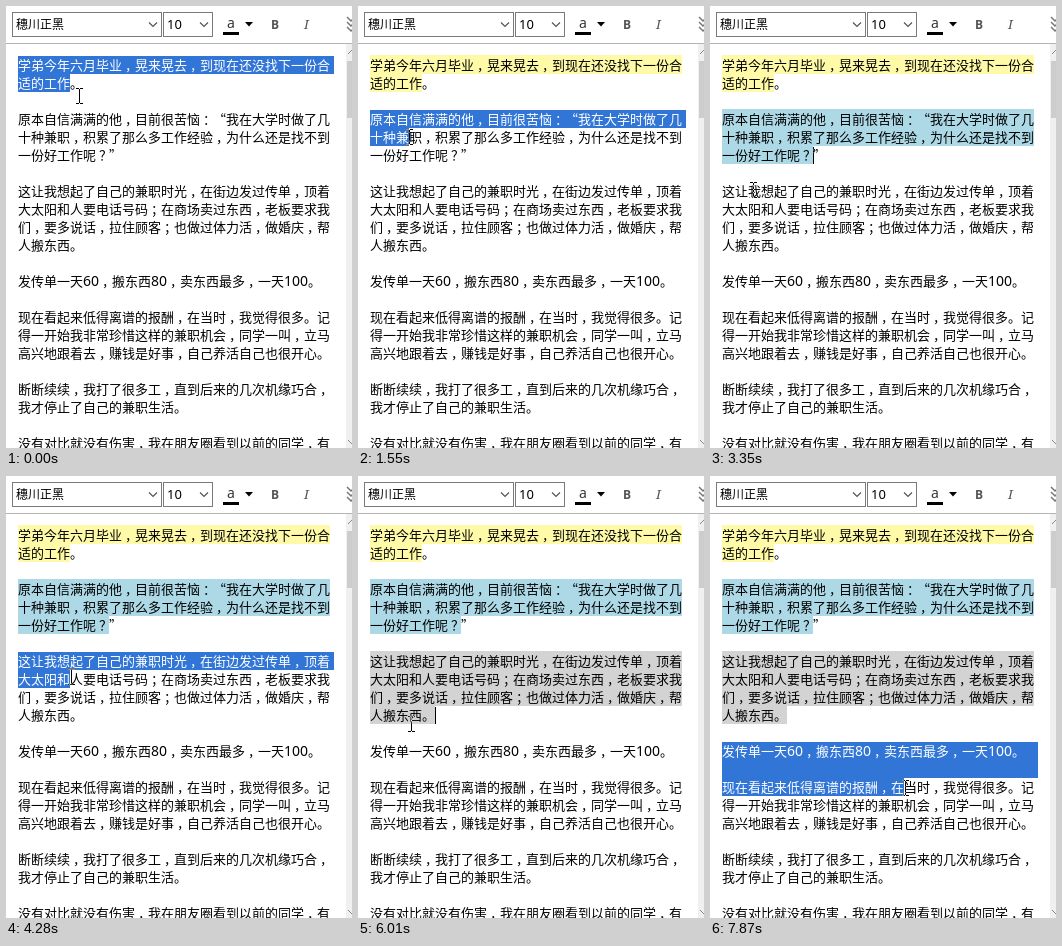
An HTML page with a canvas for the animation above (8000 ms loop, 346 by 442 pixels).

```html
<!DOCTYPE html>
<html lang="zh-CN">
<head>
<meta charset="utf-8">
<style>
  html, body { margin: 0; width: 100%; height: 100%; overflow: hidden; background: #fff; }
  canvas { display: block; }
</style>
</head>
<body>
<canvas id="stage" width="346" height="442"></canvas>
<script>
const ctx = document.getElementById('stage').getContext('2d', { alpha: false });
const LOOP = 8000, STEP = 135, CARET_TIME = 300;
const LEFT = 12, TOP = 50, PITCH = 18, SIZE = 13;
const TEXT_END = 324, SELECT_END = 328, BLUE = '#3175d7';
const CJK = '"Noto Sans CJK SC", "Noto Sans CJK", sans-serif';
const LATIN = '"Noto Sans", sans-serif';

const LINES = `学弟今年六月毕业，晃来晃去，到现在还没找下一份合
适的工作。

原本自信满满的他，目前很苦恼：“我在大学时做了几
十种兼职，积累了那么多工作经验，为什么还是找不到
一份好工作呢？”

这让我想起了自己的兼职时光，在街边发过传单，顶着
大太阳和人要电话号码；在商场卖过东西，老板要求我
们，要多说话，拉住顾客；也做过体力活，做婚庆，帮
人搬东西。

发传单一天60，搬东西80，卖东西最多，一天100。

现在看起来低得离谱的报酬，在当时，我觉得很多。记
得一开始我非常珍惜这样的兼职机会，同学一叫，立马
高兴地跟着去，赚钱是好事，自己养活自己也很开心。

断断续续，我打了很多工，直到后来的几次机缘巧合，
我才停止了自己的兼职生活。

没有对比就没有伤害，我在朋友圈看到以前的同学，有`.split('\n');

// Key points of the mouse path: time, x, y
const PATH = [
  [-600, 12, 59], [-135, 66, 77], [0, 73, 90], [530, 60, 126],
  [1280, 15, 112], [1550, 51, 131], [1820, 78, 146], [2090, 105, 147],
  [2770, 105, 147], [3350, 43, 184], [3890, 18, 185], [4280, 65, 201],
  [4830, 74, 233], [5730, 74, 233], [6540, 12, 278], [7100, 18, 277],
  [7600, 129, 307], [7870, 195, 312],
];

// Text is selected from press to release, then coloured at the mark time
const DRAGS = [
  { press: -600, release: -135, mark: 530, color: '#fffaa8' },
  { press: 1280, release: 2090, mark: 3350, color: '#add8e6' },
  { press: 3890, release: 4830, mark: 6010, color: '#d3d3d3' },
  { press: 7100, release: 7870, mark: LOOP },
];

// The mouse moves in even steps of about STEP ms between key points
function pointerAt(t) {
  const next = PATH.findIndex(([time]) => time > t);
  if (next < 0) return PATH.at(-1).slice(1);
  const [t0, x0, y0] = PATH[next - 1], [t1, x1, y1] = PATH[next];
  const steps = Math.max(1, Math.round((t1 - t0) / STEP));
  const part = Math.floor((t - t0) / (t1 - t0) * steps) / steps;
  return [Math.round(x0 + (x1 - x0) * part), Math.round(y0 + (y1 - y0) * part)];
}

const lineTop = line => TOP + line * PITCH;

function textPosition([x, y]) {
  return {
    x: LEFT + Math.round((x - LEFT) / SIZE) * SIZE,
    line: Math.floor((y - TOP) / PITCH),
  };
}

function spanRects(drag, t, edge) {
  const first = textPosition(pointerAt(drag.press)).line;
  const end = textPosition(pointerAt(Math.min(t, drag.release)));
  const rects = [];
  for (let line = first; line <= end.line; line++) {
    const right = line < end.line ? edge : end.x;
    rects.push([LEFT, lineTop(line), right - LEFT, PITCH]);
  }
  return rects;
}

function rect(x, y, w, h, color) {
  ctx.fillStyle = color;
  ctx.fillRect(x, y, w, h);
}

function write(text, x, y, font, color) {
  ctx.font = font;
  ctx.fillStyle = color;
  ctx.fillText(text, x, y);
}

function stroke(points, color, width) {
  ctx.strokeStyle = color;
  ctx.lineWidth = width;
  ctx.beginPath();
  points.forEach(([x, y]) => ctx.lineTo(x, y));
  ctx.stroke();
}

const chevron = (x, y, r, color, width) =>
  stroke([[x - r, y - r / 2], [x, y + r / 2], [x + r, y - r / 2]], color, width);

function drawBox(x, width, text, font) {
  ctx.strokeStyle = '#7a7a7a';
  ctx.lineWidth = 1;
  ctx.strokeRect(x + 0.5, 6.5, width, 24);
  write(text, x + 4, 23, font, '#000');
  chevron(x + width - 8, 18.5, 4, '#555', 1.2);
}

function drawToolbar() {
  drawBox(6, 149, '穗川正黑', `12px ${CJK}`);
  drawBox(157, 49, '10', `13px ${LATIN}`);
  write('a', 221, 22, `14px ${LATIN}`, '#333');
  rect(217, 26, 16, 3, '#000');
  ctx.beginPath();
  ctx.moveTo(239, 16);
  ctx.lineTo(247, 16);
  ctx.lineTo(243, 20.5);
  ctx.fill();
  write('B', 265, 23, `bold 12px ${LATIN}`, '#555');
  write('I', 298, 23, 'italic 13px "Noto Serif", serif', '#555');
  for (let y = 13; y < 25; y += 5) chevron(345, y, 4, '#777', 1.5);
  rect(0, 37, 346, 1, '#b4b4b4');
}

function drawScrollbar() {
  rect(340, 38, 6, 404, '#f0f0f0');
  rect(341, 55, 5, 57, '#cdcdcd');
  chevron(346, 46, -4, '#888', 1);
  chevron(346, 436, 4, '#888', 1);
}

function drawText(color) {
  LINES.forEach((text, line) => {
    let x = LEFT;
    for (const char of text) {
      const digit = /\d/.test(char);
      const indent = /[，；：？]/.test(char) ? 3 : 0;
      const font = digit ? `14px ${LATIN}` : `${SIZE}px ${CJK}`;
      write(char, x + indent, lineTop(line) + 14, font, color);
      x += digit ? ctx.measureText(char).width : SIZE;
    }
  });
}

function drawSelection(drag, t) {
  ctx.save();
  ctx.beginPath();
  spanRects(drag, t, SELECT_END).forEach(r => ctx.rect(...r));
  ctx.clip();
  rect(0, 0, 346, 442, BLUE);
  drawText('#fff');
  ctx.restore();
}

function drawCaret(drag, t) {
  const { x, line } = textPosition(pointerAt(Math.min(t, drag.release)));
  const empty = x === LEFT && t < drag.release;
  const justMarked = t >= drag.mark && t < drag.mark + CARET_TIME;
  if (empty || justMarked) rect(x, lineTop(line) + 1, 1, 17, '#fff');
}

function drawPointer([x, y]) {
  rect(x, y - 7, 1, 14, '#fff');
  for (const edge of [y - 8, y + 7]) {
    rect(x - 3, edge, 3, 1, '#fff');
    rect(x + 1, edge, 3, 1, '#fff');
  }
}

function draw(t) {
  rect(0, 0, 346, 442, '#fff');
  const started = DRAGS.filter(drag => t >= drag.press);
  for (const drag of started.filter(({ mark }) => t >= mark)) {
    for (const [x, y, w, h] of spanRects(drag, t, TEXT_END)) {
      rect(x, y - 1, w, h + 1, drag.color);
    }
  }
  drawText('#000');
  started.filter(({ mark }) => t < mark).forEach(drag => drawSelection(drag, t));
  drawToolbar();
  drawScrollbar();

  // Caret and pointer invert whatever lies below them
  ctx.globalCompositeOperation = 'difference';
  started.forEach(drag => drawCaret(drag, t));
  drawPointer(pointerAt(t));
  ctx.globalCompositeOperation = 'source-over';
}

const begin = performance.now();
function tick() {
  draw((performance.now() - begin) % LOOP);
  requestAnimationFrame(tick);
}
tick();
</script>
</body>
</html>
```
